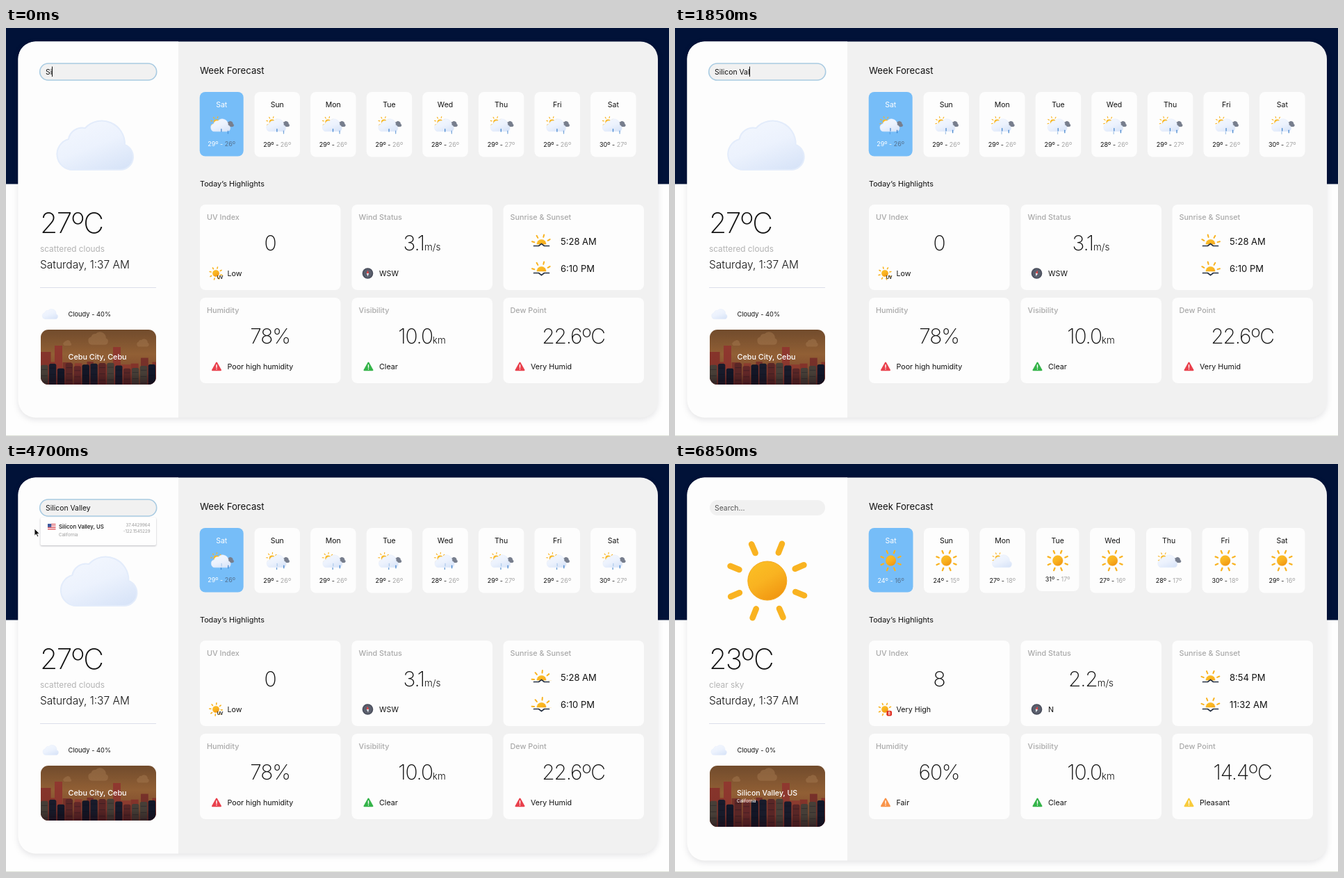
These frames come from a looping animation (954 by 587 pixels, 6.9 s). An HTML page:

```html
<!DOCTYPE html>
<html lang="en">
<head>
<meta charset="utf-8">
<title>Weather dashboard</title>
<style>
html, body { margin: 0; width: 100%; height: 100%; overflow: hidden; background: #fefefe; }
svg { display: block; width: 954px; height: 587px; font-family: Inter, "Open Sans", sans-serif; }
text { white-space: pre; }
.display { font-weight: 200; letter-spacing: -.04em; }
.display tspan { font-weight: 300; letter-spacing: 0; }
</style>
</head>
<body>
<svg id="stage" viewBox="0 0 954 587"></svg>
<script>
const LOOP = 6900, SWITCH = 5250;
const stage = document.getElementById('stage');
const CLOUD = 'M24 72A22.4 22.4 0 0 1 18 28A20 20 0 0 1 42 12A33 33 0 0 1 99 36A18.6 18.6 0 0 1 92 72Z';

const rect = (x, y, w, h, r, fill, extra = '') =>
  `<rect x="${x}" y="${y}" width="${w}" height="${h}" rx="${r}" fill="${fill}" ${extra}/>`;
const text = (x, y, size, str, { fill = '#111', weight = 400, anchor = 'start', id = '', kind = '' } = {}) =>
  `<text x="${x}" y="${y}" font-size="${size}" fill="${fill}" font-weight="${weight}" text-anchor="${anchor}" class="${kind}" ${id && `id="${id}"`}>${str}</text>`;
const at = (x, y, body, scale = 1) => `<g transform="translate(${x} ${y}) scale(${scale})">${body}</g>`;
const sway = (amp, body) => `<g class="sway" data-amp="${amp}">${body}</g>`;
const cloud = (scale, fill = 'url(#cloud)', stroke = '#e3ecfb') =>
  `<path d="${CLOUD}" transform="scale(${scale})" fill="${fill}" stroke="${stroke}" stroke-width="2"/>`;

function sun(radius, inner, outer, width) {
  let rays = '';
  for (let i = 0; i < 8; i++)
    rays += `<path d="M0 ${-inner}V${-outer}" transform="rotate(${i * 45})"/>`;
  return `<g class="spin" stroke="#f9b321" stroke-width="${width}" stroke-linecap="round">${rays}</g>` +
    `<circle r="${radius}" fill="url(#sun)" stroke="#f5a81b" stroke-width="${radius / 28}"/>`;
}
const fullSun = () => sun(28, 43.5, 57.3, 8.6);

// Small forecast icons, drawn around their own centre
const smallSun = () => at(0, 0, fullSun(), .265);
const peekingSun = () => at(-7.5, -3.5, sun(4, 6.3, 8.2, 1.15));
const darkCloud = () => at(5.5, -5, cloud(.11, '#777e8d', '#777e8d'));
const frontCloud = () => at(-15.5, -8.5, sway(.7, cloud(.255)));
const drop = (x, phase) =>
  `<path class="drop" data-phase="${phase}" d="M${x} 4v3.5" stroke="#2f78c8" stroke-width="1.3" stroke-linecap="round"/>`;
const icons = {
  rain: () => peekingSun() + darkCloud() + drop(0, 0) + frontCloud() + drop(0, .35) + drop(10, .75),
  sun: smallSun,
  fair: () => at(1, 0, peekingSun() + frontCloud()),
  clouds: () => peekingSun() + darkCloud() + frontCloud()
};

function dayCard(x, w, name, icon, high, low, active, lift = 0) {
  const mid = x + w / 2;
  const temp = `${high}º - <tspan fill="${active ? '#55718f' : '#a6a6a6'}">${low}º</tspan>`;
  const ink = active ? '#fff' : '#111';
  return rect(x, 92, w, (active ? 92.5 : 93.5) - lift * 1.2, 8, active ? '#76bdf8' : '#fdfdfd') +
    text(mid, 114, 10.5, name, { fill: ink, anchor: 'middle' }) +
    at(mid, 139, icons[icon]()) +
    text(mid, (active && icon === 'rain' ? 169.5 : 171) - lift, 9, temp, { fill: ink, anchor: 'middle' });
}

function highlight(col, row, title, value, unit, foot, icon) {
  const x = [279, 497.5, 715.5][col], y = row ? 388 : 254;
  const number = value + (unit ? `<tspan font-size="13.5">${unit}</tspan>` : '');
  return rect(x, y, 202.5, 123, 8, '#fdfdfd') +
    text(x + 10, y + 21.5, 10.8, title, { fill: '#a9a9a9', weight: 500 }) +
    text(x + 101, y + 66, 30, number, { kind: 'display', anchor: 'middle' }) +
    (icon ? at(x + (row ? 24 : col ? 23 : 24), y + 99, icon) : '') +
    text(x + 39.5, y + 103, 10.7, foot);
}

const alertIcon = color =>
  `<path d="M0-5.5L6 5.2H-6Z" fill="${color}" stroke="${color}" stroke-width="2" stroke-linejoin="round"/>
   <path d="M0-2.2V1.4M0 3.5v.3" stroke="#fff" stroke-width="1.4" stroke-linecap="round"/>`;
const compass = `<circle r="7.8" fill="#494d5b"/><circle r="6.2" fill="#5b606e"/>
  <g class="needle"><path d="M0-4.5L1.7 0H-1.7Z" fill="#ef4444"/><path d="M0 4.5L1.7 0H-1.7Z" fill="#e5e7eb"/></g>`;
const uvIcon = badge => at(-1, 0, sun(4.8, 7.2, 9.2, 1.6)) + (badge
  ? rect(1.5, 2, 7.5, 7.5, 2, '#df2b20') + text(5.2, 7.9, 5.5, badge, { fill: '#fff', weight: 700, anchor: 'middle' })
  : text(9.5, 8, 6, 'UV', { weight: 700, anchor: 'end', fill: '#222' }));

function horizon(y, time, dir) {
  return at(770.5, y, `<g clip-path="url(#above)">${at(0, 4, sun(6.8, 10.5, 14, 2))}</g>
    <path d="M-11 6.5H-4L0 ${6.5 + 3.2 * dir}L4 6.5H11" fill="none" stroke="#263142" stroke-width="1.7" stroke-linecap="round" stroke-linejoin="round"/>`) +
    text(798, y + 5, 13, time);
}

function skyline(height) {
  let seed = 7;
  const rnd = () => (seed = seed * 16807 % 2147483647) / 2147483647;
  const pick = list => list[Math.floor(rnd() * list.length)];
  let body = rect(50, 434, 166, height, 0, 'url(#dusk)');
  const puff = (x, y, s) => at(x, y, `<path d="${CLOUD}" fill="#b98a5c" opacity=".4"/>`, s);
  body += puff(118, 437, .26) + puff(82, 449, .11) + puff(188, 447, .16);
  for (let x = 50; x < 216; x += 12 + rnd() * 8)
    body += rect(x, 466 + rnd() * 20, 9 + rnd() * 6, 60, 0, pick(['#93392f', '#9c4234', '#84362e']));
  body += rect(70, 457, 11, 70, 0, '#9c3d33') + rect(154, 459, 11, 70, 0, '#9c3d33');
  for (let x = 50; x < 216; x += 11.9) {
    const y = 477 + rnd() * 14;
    body += rect(x, y, 10.4, 60, 2.5, pick(['#15192b', '#1b1e30', '#642b2b', '#4f463e', '#141a2e', '#6e2c2d']));
    for (let k = 6; k < 44; k += 9) body += rect(x + 1, y + k, 8.4, 1, 0, '#0b0f1d', 'opacity=".3"');
  }
  return `<g clip-path="url(#photo${height})">${body}${rect(50, 434, 166, height, 0, 'url(#shade)')}</g>`;
}

function scene(s) {
  let out = `<g filter="url(#soft)">${rect(17.5, 19.5, 920.5, s.bottom - 19.5, 25, '#f1f1f1')}</g>
    <path d="M248 19.5H42.5a25 25 0 0 0-25 25V${s.bottom - 25}a25 25 0 0 0 25 25H248Z" fill="#fdfdfd"/>`;
  out += s.hero;
  out += text(49, 295, 41, s.temp, { kind: 'display' }) +
    text(49, 322, 11.8, s.sky, { fill: '#b3b3b3' }) +
    text(49, 345.5, 15.5, 'Saturday, 1:37 AM', { weight: 300 }) +
    rect(49, 373, 167, 1, 0, '#dcdfea') +
    at(52.5, 404, sway(1, cloud(.205))) +
    text(89.5, 415.3, 9.3, `Cloudy - ${s.cover}%`) +
    skyline(s.photo) + s.place;
  out += text(279, 66, 13.2, 'Week Forecast') +
    text(279, 228, 10.8, 'Today’s Highlights');
  s.days.forEach((d, i) => out += dayCard(d[0], d[1], ['Sat', 'Sun', 'Mon', 'Tue', 'Wed', 'Thu', 'Fri', 'Sat'][i], d[2], d[3], d[4], i === 0, d[5]));
  out += highlight(0, 0, 'UV Index', s.uv[0], '', s.uv[1], `<g id="uv${s.id}">${uvIcon(s.uv[2])}</g>`) +
    highlight(1, 0, 'Wind Status', s.wind[0], 'm/s', s.wind[1], compass) +
    highlight(2, 0, 'Sunrise &amp; Sunset', '', '', '') +
    horizon(307, s.rise, -1) + horizon(346, s.set, 1) +
    highlight(0, 1, 'Humidity', s.humid[0], '', s.humid[1], alertIcon(s.humid[2])) +
    highlight(1, 1, 'Visibility', '10.0', 'km', 'Clear', alertIcon('#35b44a')) +
    highlight(2, 1, 'Dew Point', s.dew[0], '', s.dew[1], alertIcon(s.dew[2]));
  return `<g id="${s.id}">${out}</g>`;
}

const rainDays = [[29, 26], [29, 26], [29, 26], [29, 26], [28, 26], [29, 27], [29, 26], [30, 27]];
const before = scene({
  id: 'before', bottom: 560.5, photo: 79, temp: '27ºC', sky: 'scattered clouds', cover: 40,
  hero: at(75.7, 132, sway(6.3, cloud(1))),
  place: text(89.5, 476.5, 10.8, 'Cebu City, Cebu', { fill: '#fff', weight: 500 }),
  days: rainDays.map(([hi, lo], i) => [i ? 357.5 + (i - 1) * 80.6 : 278.7, i ? 65.5 : 63, 'rain', hi, lo]),
  uv: ['0', 'Low', ''], wind: ['3.1', 'WSW'], rise: '5:28 AM', set: '6:10 PM',
  humid: ['78%', 'Poor high humidity', '#e9414d'], dew: ['22.6ºC', 'Very Humid', '#e9414d']
});
const after = scene({
  id: 'after', bottom: 570.5, photo: 88, temp: '23ºC', sky: 'clear sky', cover: 0,
  hero: at(132.8, 168, fullSun()),
  place: text(89, 476.5, 10.6, 'Silicon Valley, US', { fill: '#fff', weight: 500 }) +
    text(89, 487, 6, 'California', { fill: '#fff', weight: 500 }),
  days: [[278.7, 63.8, 'sun', 24, 16], [358, 65, 'sun', 24, 15], [438.5, 65.5, 'fair', 27, 18],
    [520, 61.5, 'sun', 31, 17, 2], [597, 65, 'sun', 27, 16], [678, 65, 'clouds', 28, 17],
    [758.5, 66.5, 'sun', 30, 18], [840.5, 66, 'sun', 29, 16]],
  uv: ['8', 'Very High', '8'], wind: ['2.2', 'N'], rise: '8:54 PM', set: '11:32 AM',
  humid: ['60%', 'Fair', '#f9944a'], dew: ['14.4ºC', 'Pleasant', '#f8cb3c']
});

let flag = '';
for (let i = 0; i < 7; i++) flag += rect(60, 86 + i * 1.2, 11.5, 1.2, 0, i % 2 ? '#fff' : '#d8404a');
flag += rect(60, 86, 5.2, 4.8, 0, '#3c5a9e');

const gradient = (id, stops, dir) => `<linearGradient id="${id}" ${dir}>${stops.map(([o, c, a = 1]) =>
  `<stop offset="${o}" stop-color="${c}" stop-opacity="${a}"/>`).join('')}</linearGradient>`;
const down = 'x1="0" y1="0" x2="0" y2="1"', diagonal = 'x1=".2" y1="0" x2=".8" y2="1"';

stage.innerHTML = `<defs>
  ${gradient('cloud', [[0, '#f3f7fe'], [.5, '#ecf2fd'], [1, '#d8e4f8']], diagonal)}
  ${gradient('sun', [[0, '#fbbf24'], [.45, '#f9b321'], [1, '#f0930f']], diagonal)}
  ${gradient('dusk', [[0, '#78502f'], [.45, '#a0693a'], [1, '#8a4a32']], down)}
  ${gradient('shade', [[0, '#000', .06], [.8, '#000', .12], [1, '#200510', .5]], down)}
  <clipPath id="above"><path d="M-20-20H20V4.2H-20Z"/></clipPath>
  ${[79, 88].map(h => `<clipPath id="photo${h}">${rect(50, 434, 166, h, 11, '#000')}</clipPath>`).join('')}
  <filter id="soft" x="-5%" y="-5%" width="110%" height="112%" color-interpolation-filters="sRGB"><feDropShadow dx="0" dy="3" stdDeviation="4" flood-color="#001" flood-opacity=".1"/></filter>
  <filter id="lift" x="-10%" y="-20%" width="120%" height="150%" color-interpolation-filters="sRGB"><feDropShadow dx="0" dy="1" stdDeviation="1.3" flood-color="#223" flood-opacity=".3"/></filter>
</defs>
${rect(0, 0, 954, 587, 0, '#fefefe')}${rect(0, 0, 954, 224.5, 0, '#011238')}${rect(0, 586, 954, 1, 0, '#dfe2d8')}
${before}${after}
<g id="focused">
  ${rect(48.7, 51, 168, 24, 12, '#f1f1f1', 'stroke="#a9cbe2" stroke-width="1.6"')}
  ${text(57, 66.5, 10.4, '', { id: 'query' })}
  <path id="caret" d="M0 55.5V70" stroke="#111"/>
</g>
<g id="idle">${rect(50, 52, 166, 22, 11, '#f1f1f1')}${text(57, 66.5, 10.4, 'Search...', { fill: '#555' })}</g>
<g id="menu">
  <g filter="url(#lift)">${rect(49.5, 77, 166.5, 40, 2, '#fefefe')}</g>${flag}
  ${text(76, 93.3, 7.9, 'Silicon Valley, US', { weight: 500 })}
  ${text(76, 104, 6.1, 'California', { fill: '#999' })}
  ${text(207.5, 90, 6.1, '37.4429964', { fill: '#999', anchor: 'end' })}
  ${text(207.5, 99, 6.1, '-122.1545229', { fill: '#999', anchor: 'end' })}
</g>
<path id="pointer" d="M0 0V10.2L2.4 8L4.1 11.8L5.7 11.1L4.1 7.4H7.3Z" fill="#111" stroke="#fff" stroke-width=".8"/>`;

const byId = id => document.getElementById(id);
const [sways, spins, drops, needles] = ['sway', 'spin', 'drop', 'needle'].map(c => [...stage.querySelectorAll('.' + c)]);
const show = (id, on) => byId(id).setAttribute('display', on ? 'inline' : 'none');
const move = (el, x, y = 0) => el.setAttribute('transform', `translate(${x} ${y})`);

// Moment each letter after "Si" is typed
const PHRASE = 'Silicon Valley';
const KEYS = [150, 300, 450, 600, 800, 1150, 1350, 1550, 1750, 2100, 2400, 3000];
const POINTER = [[4500, 36, 86], [4700, 41, 93], [4950, 96, 97], [5250, 98, 98], [5750, 552, 447], [6250, 960, 560]];
const ease = p => p * p * (3 - 2 * p);

function pointerAt(t) {
  const i = POINTER.findIndex(p => p[0] > t);
  if (i < 1) return null;
  const [a, b] = [POINTER[i - 1], POINTER[i]], p = ease((t - a[0]) / (b[0] - a[0]));
  return [a[1] + (b[1] - a[1]) * p, a[2] + (b[2] - a[2]) * p];
}

function render(t) {
  const changed = t >= SWITCH;
  show('before', !changed);
  show('after', changed);
  show('focused', !changed);
  show('idle', changed);
  show('menu', t >= 3550 && !changed);
  show('uvafter', t >= 6100);

  const typed = KEYS.filter(k => k <= t).length, query = byId('query');
  query.textContent = PHRASE.slice(0, 2 + typed);
  const lastKey = typed ? KEYS[typed - 1] : 0;
  show('caret', Math.floor((t - lastKey) / 500) % 2 === 0);
  if (!changed) move(byId('caret'), Math.round(57 + query.getComputedTextLength()) + .5);

  const phase = ((t - 600 + 6000) % 6000) / 3000;
  const drift = 2 * (phase < 1 ? phase : 2 - phase) - 1;
  for (const el of sways) move(el, drift * el.dataset.amp);
  for (const el of spins) el.setAttribute('transform', `rotate(${((t - 3960) * .0075 + 45) % 45})`);
  for (const el of drops) {
    const p = (t / 1000 + +el.dataset.phase) % 1;
    move(el, -p, p * 7);
    el.setAttribute('opacity', .85 * Math.min(1, 3 * (1 - p), 6 * p));
  }
  for (const el of needles) el.setAttribute('transform', `rotate(${20 * Math.sin(t / 800)})`);

  const spot = pointerAt(t);
  show('pointer', spot);
  if (spot) move(byId('pointer'), ...spot);
}

const start = performance.now();
function tick() {
  render((performance.now() - start) % LOOP);
  requestAnimationFrame(tick);
}
tick();
</script>
</body>
</html>
```
